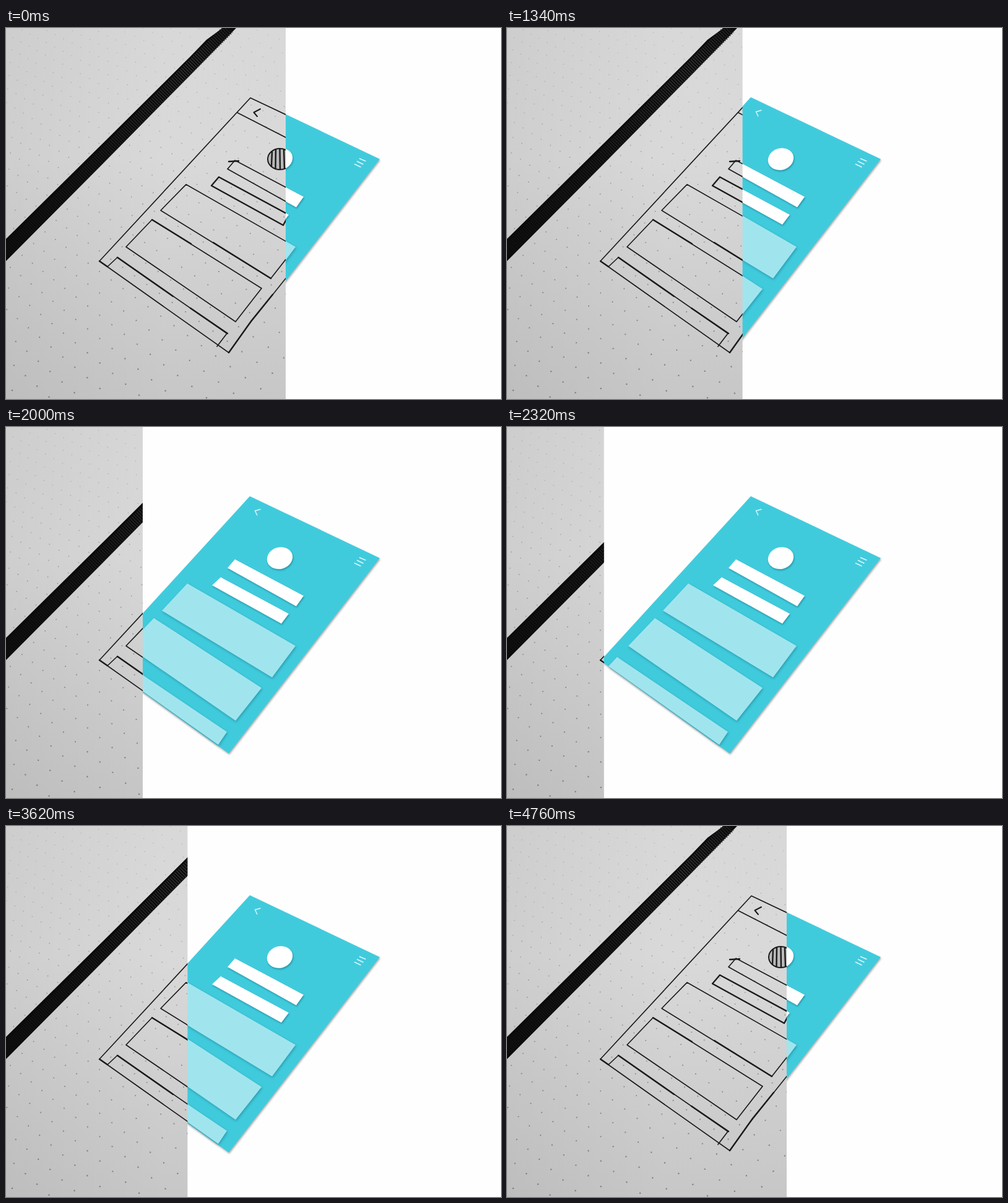
Recreate the animation shown at these times as an HTML page. Size 800 by 600 pixels, loop 4.78 s.

```html
<!DOCTYPE html>
<html lang="en">
<head>
<meta charset="utf-8">
<title>Sketch to screen</title>
<style>
  html, body { margin: 0; width: 100%; height: 100%; overflow: hidden; background: #fefefe; }
  svg { position: absolute; left: 0; top: 0; width: 800px; height: 600px; }
  #sketch { animation: wipe 4780ms linear infinite; }
  @keyframes wipe {
    0% { clip-path: inset(0 348px 0 0); }
    11.715% { clip-path: inset(0 348px 0 0); animation-timing-function: cubic-bezier(.486, 0, .661, 1); }
    55.649% { clip-path: inset(0 668px 0 0); animation-timing-function: cubic-bezier(.33, 0, .55, 1); }
    99.582%, 100% { clip-path: inset(0 348px 0 0); }
  }
  .card { fill: #40cbdd; filter: drop-shadow(1px 2px 1.5px rgba(0, 0, 0, .32)); }
  .panel { fill: #a0e5ee; filter: drop-shadow(1px 2px 2px rgba(0, 70, 90, .36)); }
  .white { fill: #fff; filter: drop-shadow(1px 2px 1.5px rgba(0, 70, 90, .4)); }
  .icon { fill: none; stroke: #e2f7fa; stroke-width: 1.4; }
  .ink { fill: none; stroke: #1b1b1b; stroke-width: 1.7; stroke-linejoin: round; stroke-linecap: round; }
  .bold { stroke-width: 2.4; }
</style>
</head>
<body>
<svg id="screen" viewBox="0 0 800 600">
  <path class="card" d="M394 112L604 212L360 528L151 378Z"/>
  <g class="panel">
    <path d="M293 253L468 354L430 405L252 297Z"/>
    <path d="M239 309L413 422L371 475L196 354Z"/>
    <path d="M178 372L357 493L343 514L164 387Z"/>
  </g>
  <g class="white">
    <path d="M370 214L481 273L469 290L358 228Z"/>
    <path d="M347 243L457 302L445 318L333 256Z"/>
    <ellipse cx="442.5" cy="212" rx="21" ry="17.5" transform="rotate(-18 442.5 212)"/>
  </g>
  <path class="icon" d="M411.5 133L402.5 135.5L406 143M571 211L581.5 215.5M567 215.5L577.5 220.5M563 220L573.5 225"/>
</svg>

<svg id="sketch" viewBox="0 0 800 600">
  <defs>
    <linearGradient id="paper" x1="0" y1="0" x2="0" y2="1">
      <stop offset="0" stop-color="#d8d8d8"/>
      <stop offset=".35" stop-color="#d9d9d9"/>
      <stop offset=".7" stop-color="#cfcfcf"/>
      <stop offset="1" stop-color="#c7c7c7"/>
    </linearGradient>
    <linearGradient id="shade" gradientUnits="userSpaceOnUse" x1="0" y1="0" x2="260" y2="0">
      <stop offset="0" stop-opacity=".05"/>
      <stop offset="1" stop-opacity="0"/>
    </linearGradient>
    <linearGradient id="rib" gradientUnits="userSpaceOnUse" x1="0" y1="362" x2="360" y2="6">
      <stop offset="0" stop-color="#101010"/>
      <stop offset=".45" stop-color="#1e1e1e"/>
      <stop offset=".85" stop-color="#353535"/>
      <stop offset="1" stop-color="#222"/>
    </linearGradient>
  </defs>
  <rect width="460" height="600" fill="url(#paper)"/>
  <rect width="460" height="600" fill="url(#shade)"/>
  <g id="dots" fill="#6f6f6f"></g>

  <path fill="#0b0b0b" d="M350 0L324 19L298 46L157 186L0 341V377L157 219L298 76L372 0Z"/>
  <path fill="none" stroke="url(#rib)" stroke-width="19" stroke-dasharray="1.4 2.4" d="M0 362L157 205L298 63L360 1"/>

  <path class="ink" d="M395 113L604 212L452 405L392 480L360 525L151 377Z"/>
  <path class="ink" d="M374 137L452 177L580 240"/>
  <path class="ink" d="M291 253L468 354L428 405L250 295Z"/>
  <path class="ink" d="M236 310L413 421L371 475L194 354Z"/>
  <path class="ink" d="M180 371L357 494L341 515M180 371L164 386"/>
  <path class="ink" d="M370 214L481 273L469 290L358 228Z"/>
  <path class="ink bold" d="M376 215L360 216M344 241L457 302L448 319L332 255Z"/>
  <path class="ink bold" d="M236 310L299 349M335 347L428 405M180 371L270 434M298 453L358 494M151 377L164 386M360 525L397 473L431 431"/>
  <path class="ink" style="stroke-width:2" d="M411 131L400.500 136.500L406 143"/>
  <ellipse class="ink" style="fill:#b9b9b9;stroke-width:2" cx="442.500" cy="212" rx="19.500" ry="17"/>
  <path class="ink bold" d="M430 200L429 224M436 197L435.500 227M442.500 196L443 228M449 197L450 227M455 201L456 223"/>
</svg>

<script>
  // Dot grid of the notebook page, laid out in the perspective of the drawing.
  const dots = document.getElementById('dots');
  const STEP_U = 1 / 10, STEP_V = 1 / 15;

  function addDot(u, v) {
    const w = 1 - .1035 * u - .116 * v;
    if (w < .3) return;
    const x = (147.5 * u - 260.5 * v + 394) / w;
    const y = (78 * u + 221.3 * v + 112) / w;
    if (x < 0 || x > 456 || y < 0 || y > 600) return;
    const dot = document.createElementNS('http://www.w3.org/2000/svg', 'circle');
    dot.setAttribute('cx', x.toFixed(1));
    dot.setAttribute('cy', y.toFixed(1));
    dot.setAttribute('r', (.65 + y / 1000).toFixed(2));
    dot.setAttribute('opacity', (.4 + y / 1500).toFixed(2));
    dots.appendChild(dot);
  }

  for (let i = -45; i <= 45; i++) {
    for (let j = -45; j <= 60; j++) addDot((i + .5) * STEP_U, (j + .5) * STEP_V);
  }
</script>
</body>
</html>
```
